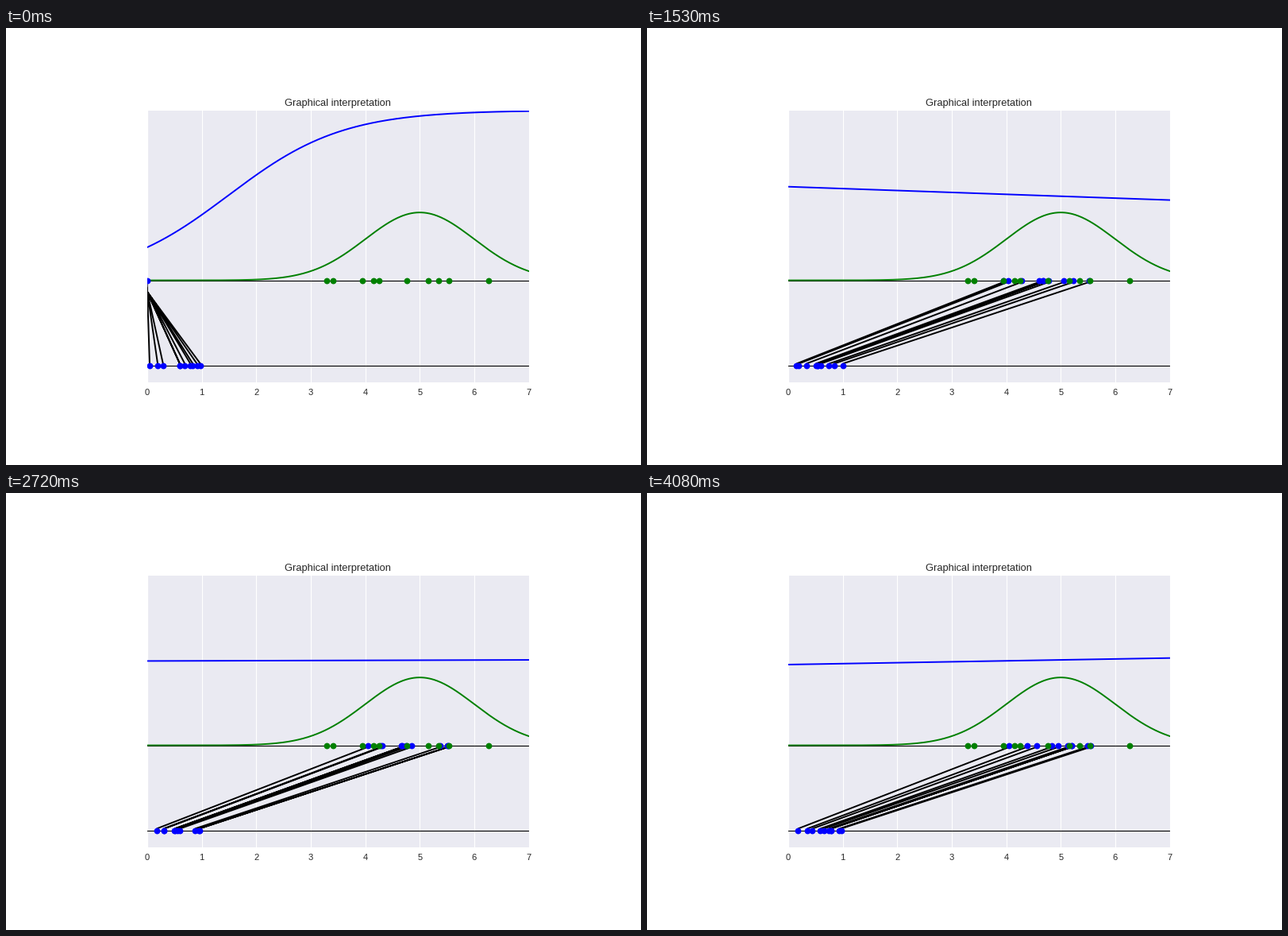
Animation, 800 px wide and 550 px high, one loop 4.25 s. Source, as a matplotlib script:

```python
import numpy as np
import matplotlib.pyplot as plt
from matplotlib.animation import FuncAnimation

W, H, DPI = 800, 550, 80
FRAMES, STEP_MS = 25, 170
SAMPLES = 10
BASE = -0.5   # height of the latent axis
GAP = 0.01    # arrows stop just short of both axes

plt.rcParams["font.family"] = "Liberation Sans"

REAL = [3.29, 3.405, 3.94, 4.15, 4.25, 4.77, 5.15, 5.35, 5.54, 6.27]

# discriminator steepness: sharpens, gets fooled, then wavers about zero
STEEP_STEPS = [0, 2, 4, 8, 9, 13, 18, 21, 24]
STEEPNESS = [0.955, 2.2, 1.81, 0.1, -0.045, -0.006, 0.01, -0.044, 0.022]


def generate(z, step):
    """Affine generator easing from its start to the learned mapping."""
    learned = 1 - np.exp(-(step / 4.5) ** 2.1)
    return (2.02 * learned - 0.137) * z + 3.72 * learned


def discriminate(x, step):
    """Sigmoid whose centre moves towards the real data."""
    steep = np.interp(step, STEEP_STEPS, STEEPNESS)
    centre = 4.6 - 3.11 * np.exp(-step / 2.6)
    return 1 / (1 + np.exp(-steep * (x - centre)))


fig = plt.figure(figsize=(W / DPI, H / DPI), dpi=DPI, facecolor="white")
left, right, top, bottom = 178.0, 658.6, 103.5, 446.0
ax = fig.add_axes([left / W, 1 - bottom / H,
                   (right - left) / W, (bottom - top) / H])
ax.set(xlim=(0, 7), ylim=(-0.6, 1), facecolor="#EAEAF2", yticks=[])
ax.set_axisbelow(True)
ax.grid(axis="x", color="white", lw=1)
ax.tick_params(length=0, pad=7, labelsize=10, labelcolor="0.15")
for spine in ax.spines.values():
    spine.set_visible(False)
fig.text((left + right) / 2 / W, 1 - 98 / H, "Graphical interpretation",
         size=11.6, color="0.15", ha="center", va="baseline")

x = np.linspace(0, 7, 300)
for level in (0, BASE):
    ax.axhline(level, color="black", lw=1)
ax.plot(x, np.exp(-(x - 5) ** 2 / 2) / np.sqrt(2 * np.pi),
        color="green", lw=1.75)
decision, = ax.plot([], [], color="blue", lw=1.75)
arrows, = ax.plot([], [], color="black", lw=1.75, solid_capstyle="butt")


def dots(color):
    return ax.plot([], [], "o", color=color, ms=7, mew=0)[0]


latent, fake, real = dots("blue"), dots("blue"), dots("green")
real.set_data(REAL, np.zeros(len(REAL)))


def draw(step):
    z = np.random.default_rng(100 + step).uniform(0, 1, SAMPLES)
    g = generate(z, step)
    decision.set_data(x, discriminate(x, step))
    latent.set_data(z, np.full(SAMPLES, BASE))
    fake.set_data(g, np.zeros(SAMPLES))
    # NaN breaks keep the arrows separate within one line
    breaks = np.full(SAMPLES, np.nan)
    ends = np.tile([BASE + GAP, -GAP, np.nan], SAMPLES)
    arrows.set_data(np.column_stack([z, g, breaks]).ravel(), ends)
    return decision, latent, fake, arrows


anim = FuncAnimation(fig, draw, frames=FRAMES, interval=STEP_MS,
                     repeat=True, repeat_delay=0)
plt.show()
```
